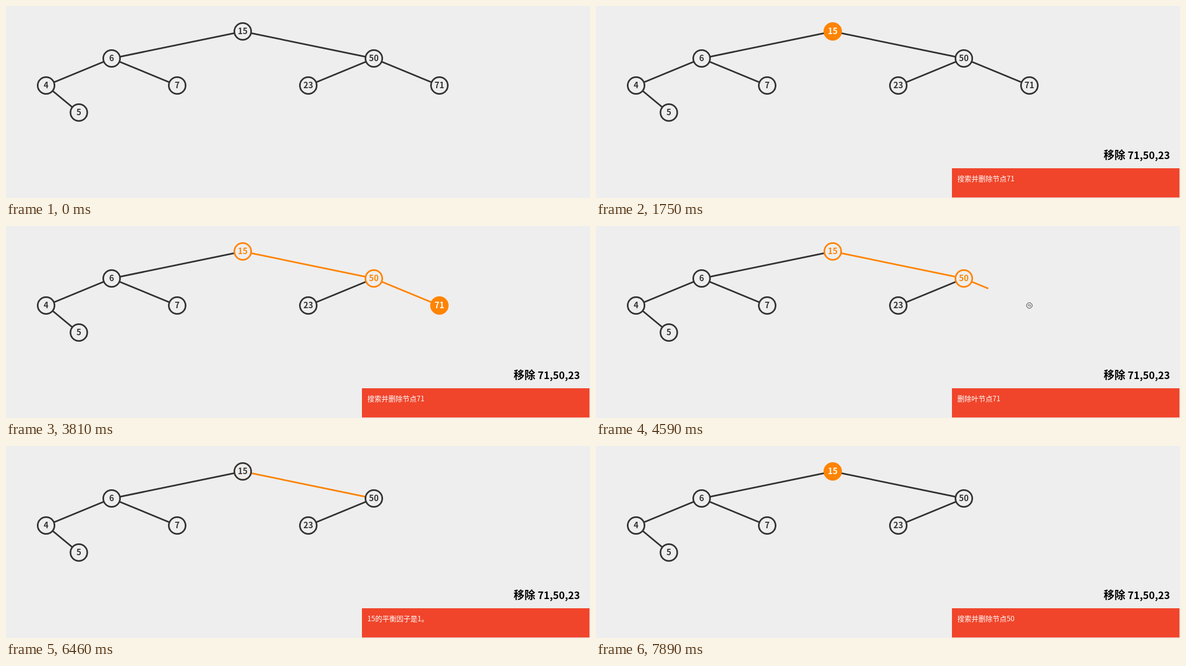
An HTML page for the animation above (8 s loop, 1078 px wide and 355 px high).

```html
<!DOCTYPE html>
<html lang="zh">
<head>
<meta charset="utf-8">
<title>AVL</title>
<style>
  html, body { margin: 0; width: 100%; height: 100%; overflow: hidden; background: #eee; }
  svg { display: block; width: 1078px; height: 355px; }
  text { font-family: "Noto Sans CJK SC", "Noto Sans CJK", "Noto Sans", sans-serif; white-space: pre; }
  .key { font-size: 15.2px; font-weight: 700; text-anchor: middle; }
  .title { font-weight: 700; fill: #000; }
  .status { font-size: 13px; fill: #fff; }
</style>
</head>
<body>
<svg id="stage" viewBox="0 0 1078 355"></svg>
<script>
const LOOP = 8000, TWEEN = 440, RADIUS = 16;
const BG = [238, 238, 238], DARK = [51, 51, 51], ORANGE = [255, 132, 0], WHITE = [255, 255, 255];

// Node styles: fill, outline, label
const PLAIN = [BG, DARK, DARK], FULL = [ORANGE, ORANGE, WHITE], RING = [BG, ORANGE, ORANGE];

const REMOVE_AT = 4342;

const nodes = {
  15: { x: 437, y: 47, keys: [[1216, FULL], [1728, RING], [4850, PLAIN], [6388, FULL], [6900, PLAIN], [7412, FULL]] },
  6: { x: 195, y: 97 },
  50: { x: 679, y: 97, keys: [[2250, FULL], [2772, RING], [4850, PLAIN], [5362, FULL], [5876, PLAIN]] },
  4: { x: 74, y: 147 },
  7: { x: 316, y: 147 },
  23: { x: 558, y: 147 },
  71: { x: 800, y: 147, keys: [[3310, FULL], [3816, PLAIN]], removeAt: REMOVE_AT },
  5: { x: 134.5, y: 197 }
};

const edges = [
  { from: 15, to: 6 },
  { from: 15, to: 50, sweepAt: 1728, keys: [[4850, [DARK]], [5876, [ORANGE]], [6388, [DARK]]] },
  { from: 6, to: 4 },
  { from: 6, to: 7 },
  { from: 4, to: 5 },
  { from: 50, to: 23 },
  { from: 50, to: 71, sweepAt: 2772, removeAt: REMOVE_AT }
];

const messages = [
  [0, '搜索并删除节点71'],
  [3816, '节点71没有孩子，是一个叶节点。'],
  [4338, '删除叶节点71'],
  [5362, '50的平衡因子是1。'],
  [5876, '检查父节点。'],
  [6388, '15的平衡因子是1。'],
  [6900, '搜索树现在是平衡的了。'],
  [7412, '搜索并删除节点50']
];

const stage = document.getElementById('stage');

function add(parent, tag, attrs, label) {
  const el = document.createElementNS('http://www.w3.org/2000/svg', tag);
  set(el, attrs);
  if (label !== undefined) el.textContent = label;
  parent.appendChild(el);
  return el;
}

function set(el, attrs) {
  for (const name in attrs) el.setAttribute(name, attrs[name]);
}

const clamp = v => Math.max(0, Math.min(1, v));
const ease = p => p < 0.5 ? 4 * p ** 3 : 1 - 4 * (1 - p) ** 3;
const progress = (t, start) => ease(clamp((t - start) / TWEEN));
const left = (t, item) => item.removeAt ? 1 - progress(t, item.removeAt) : 1;
const mix = (a, b, p) => a.map((v, i) => v + (b[i] - v) * p);
const css = c => `rgb(${c.map(Math.round).join(',')})`;

// Colours at time t, each key starting a tween from the state before it
function colours(first, keys, t) {
  let state = first;
  for (const [start, next] of keys || []) {
    if (t < start) break;
    const p = progress(t, start);
    state = state.map((c, i) => mix(c, next[i], p));
  }
  return state.map(css);
}

for (const e of edges) {
  const a = nodes[e.from], b = nodes[e.to];
  const dx = b.x - a.x, dy = b.y - a.y, len = Math.hypot(dx, dy);
  const ux = dx / len * RADIUS, uy = dy / len * RADIUS;
  e.x1 = a.x + ux;
  e.y1 = a.y + uy;
  e.dx = dx - 2 * ux;
  e.dy = dy - 2 * uy;
  e.line = add(stage, 'line', { 'stroke-width': 3 });
  if (e.sweepAt) e.sweep = add(stage, 'line', { 'stroke-width': 10, stroke: css(ORANGE) });
}

for (const key in nodes) {
  const n = nodes[key];
  n.group = add(stage, 'g', {});
  n.circle = add(n.group, 'circle', { r: 15.5, 'stroke-width': 3 });
  n.label = add(n.group, 'text', { class: 'key', y: 5.3 }, key);
}

const title = add(stage, 'g', { class: 'title' });
add(title, 'text', { x: 937, y: 283, 'font-size': 20 }, '移除');
add(title, 'text', { x: 981.5, y: 283, 'font-size': 18.6 }, '71,50,23');
const panel = add(stage, 'rect', { y: 300, height: 54, fill: '#f0452b' });
const status = add(stage, 'text', { class: 'status', y: 324 });

function span(line, e, p) {
  set(line, {
    x1: e.x1, y1: e.y1, x2: e.x1 + e.dx * p, y2: e.y1 + e.dy * p,
    visibility: p > 0 ? 'visible' : 'hidden'
  });
}

function draw(t) {
  for (const e of edges) {
    const swept = e.sweepAt && t >= e.sweepAt + TWEEN;
    span(e.line, e, left(t, e));
    set(e.line, { stroke: colours([swept ? ORANGE : DARK], e.keys, t)[0] });
    if (e.sweep) span(e.sweep, e, swept ? 0 : progress(t, e.sweepAt));
  }

  for (const key in nodes) {
    const n = nodes[key], size = left(t, n);
    const [fill, stroke, label] = colours(PLAIN, n.keys, t);
    set(n.group, {
      transform: `translate(${n.x} ${n.y}) scale(${size})`,
      visibility: size > 0 ? 'visible' : 'hidden'
    });
    set(n.circle, { fill, stroke });
    set(n.label, { fill: label });
  }

  const open = 0.5 - Math.cos(Math.PI * clamp((t - 850) / 400)) / 2;
  const x = 1077 - 420 * open;
  set(title, { visibility: t >= 870 ? 'visible' : 'hidden' });
  set(panel, { x, width: 420 * open });
  set(status, { x: x + 10, visibility: open > 0 ? 'visible' : 'hidden' });
  const message = messages.filter(m => t >= m[0]).pop()[1];
  if (status.textContent !== message) status.textContent = message;
}

let begin;
function tick(now) {
  if (begin === undefined) begin = now;
  draw((now - begin) % LOOP);
  requestAnimationFrame(tick);
}
draw(0);
requestAnimationFrame(tick);
</script>
</body>
</html>
```
